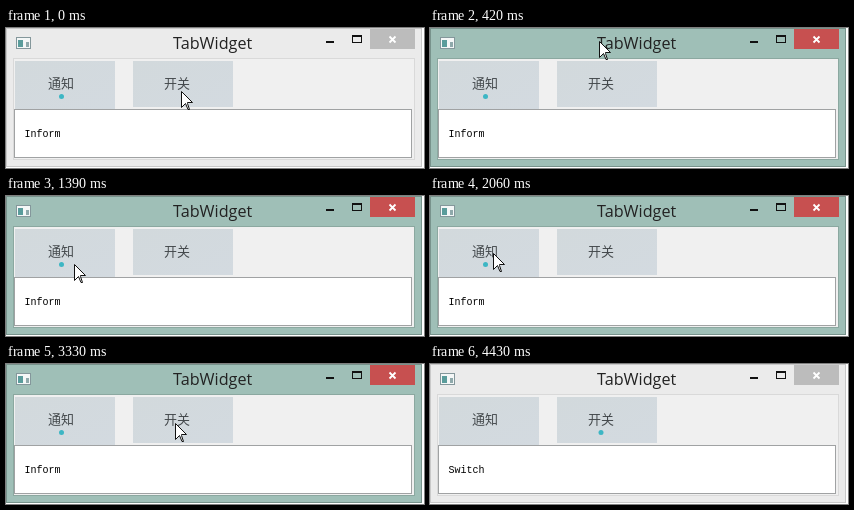
Write an HTML page that moves like this. It is 418 px wide and 140 px high and loops after 4530 ms.

```html
<!DOCTYPE html>
<html lang="zh-CN">
<head>
<meta charset="utf-8">
<title>TabWidget</title>
<style>
  html, body { margin: 0; width: 100%; height: 100%; overflow: hidden; background: #fff; }
  svg { display: block; width: 418px; height: 140px;
        --frame: #9fbfb7; --edge: #78938c; --rim: #8ba8a0; --close: #c75050; }
  svg.idle { --frame: #ebebeb; --edge: #c9c9c9; --rim: #d9d9d9; --close: #bcbcbc; }
  .frame { fill: var(--frame); stroke: var(--edge); }
  .client { fill: #f0f0f0; stroke: var(--rim); }
  .close { fill: var(--close); }
  .page { fill: #fff; stroke: #a0a2a3; }
  .title { font: 16.2px "Open Sans", "Noto Sans", sans-serif; fill: #222; }
  .tab { font: 500 13px "Noto Sans CJK SC", "Noto Sans CJK JP", sans-serif; fill: #43484b; }
  .body { font: 10px "Liberation Mono", monospace; fill: #000; }
  .dot { fill: #3db6c4; }
</style>
</head>
<body>
<svg id="win" class="idle" viewBox="0 0 418 140">
  <defs>
    <linearGradient id="face" x2="1" y2="1">
      <stop stop-color="#d2d9dc"/>
      <stop offset="1" stop-color="#d3dae0"/>
    </linearGradient>
  </defs>
  <rect class="frame" x=".5" y=".5" width="415" height="138"/>
  <rect class="client" x="7.5" y="30.5" width="401" height="101"/>

  <g shape-rendering="crispEdges">
    <rect x="10" y="9" width="15" height="12" fill="#84979b"/>
    <rect x="11" y="10" width="13" height="10" fill="#f4f7f7"/>
    <rect x="12" y="12" width="5" height="7" fill="#5a9c9b"/>
    <rect x="20" y="14" width="3" height="5" fill="#8fa9ab"/>
    <rect x="320" y="13" width="8" height="2" fill="#111"/>
    <path d="M346 7h10v8h-10z M347 9v5h8v-5z" fill="#111" fill-rule="evenodd"/>
    <rect class="close" x="364" y="1" width="45" height="20"/>
  </g>
  <path d="M383.5 8.5l6 6m0-6l-6 6" stroke="#fff" stroke-width="1.8"/>
  <text class="title" x="167" y="21">TabWidget</text>

  <rect x="9" y="33" width="100" height="48" fill="url(#face)"/>
  <rect x="127" y="33" width="100" height="46" fill="url(#face)"/>
  <text class="tab" x="42" y="59.5">通知</text>
  <text class="tab" x="158" y="59.5">开关</text>
  <circle class="dot" id="dot" cy="68.5" r="2.5"/>

  <rect class="page" x="8.5" y="81.5" width="397" height="48"/>
  <text class="body" id="label" x="18.5" y="109"></text>

  <path id="cursor" d="M.5 .5V16.5L4.5 12.5L7 18.5H8.5L6.5 12.5V11.5H11.5Z"
        fill="#fff" stroke="#111"/>
</svg>
<script>
  const LOOP = 4530, TICK = 137.4, LEAD = 20;
  const ACTIVE = [420, 4430], GONE = 3880;
  const clicks = [2460, 3060, 3590];
  const win = document.getElementById('win');
  const dot = document.getElementById('dot');
  const label = document.getElementById('label');
  const cursor = document.getElementById('cursor');

  // pointer path: tick, x, y
  const path = [
    [0, 175, 63], [2, 169, 13], [5, 169, 12], [6, 160, 37], [8, 58, 71],
    [10, 68, 68], [12, 63, 57], [15, 63, 57], [18, 177, 58], [19, 175, 58],
    [22, 75, 60], [24, 169, 59], [26, 178, 60], [27, 305, 137]
  ];

  const ease = u => u * u * (3 - 2 * u);

  function pointer(tick) {
    const i = path.findIndex(p => p[0] > tick);
    if (i < 0) return path[path.length - 1].slice(1);
    const [a, ...from] = path[i - 1], [b, ...to] = path[i];
    const u = ease((tick - a) / (b - a));
    return from.map((v, k) => Math.round(v + (to[k] - v) * u));
  }

  function draw(t) {
    // the pointer is sampled at a coarse, steady rate
    const [x, y] = pointer(Math.floor((t + LEAD) / TICK));
    cursor.setAttribute('transform', `translate(${x} ${y})`);
    cursor.style.display = t < GONE ? '' : 'none';

    const second = clicks.filter(c => c <= t).length % 2;
    dot.setAttribute('cx', second ? 171 : 55.5);
    label.textContent = second ? 'Switch' : 'Inform';
    win.classList.toggle('idle', t < ACTIVE[0] || t >= ACTIVE[1]);
  }

  const start = performance.now();
  function frame() {
    draw((performance.now() - start) % LOOP);
    requestAnimationFrame(frame);
  }
  frame();
</script>
</body>
</html>
```
